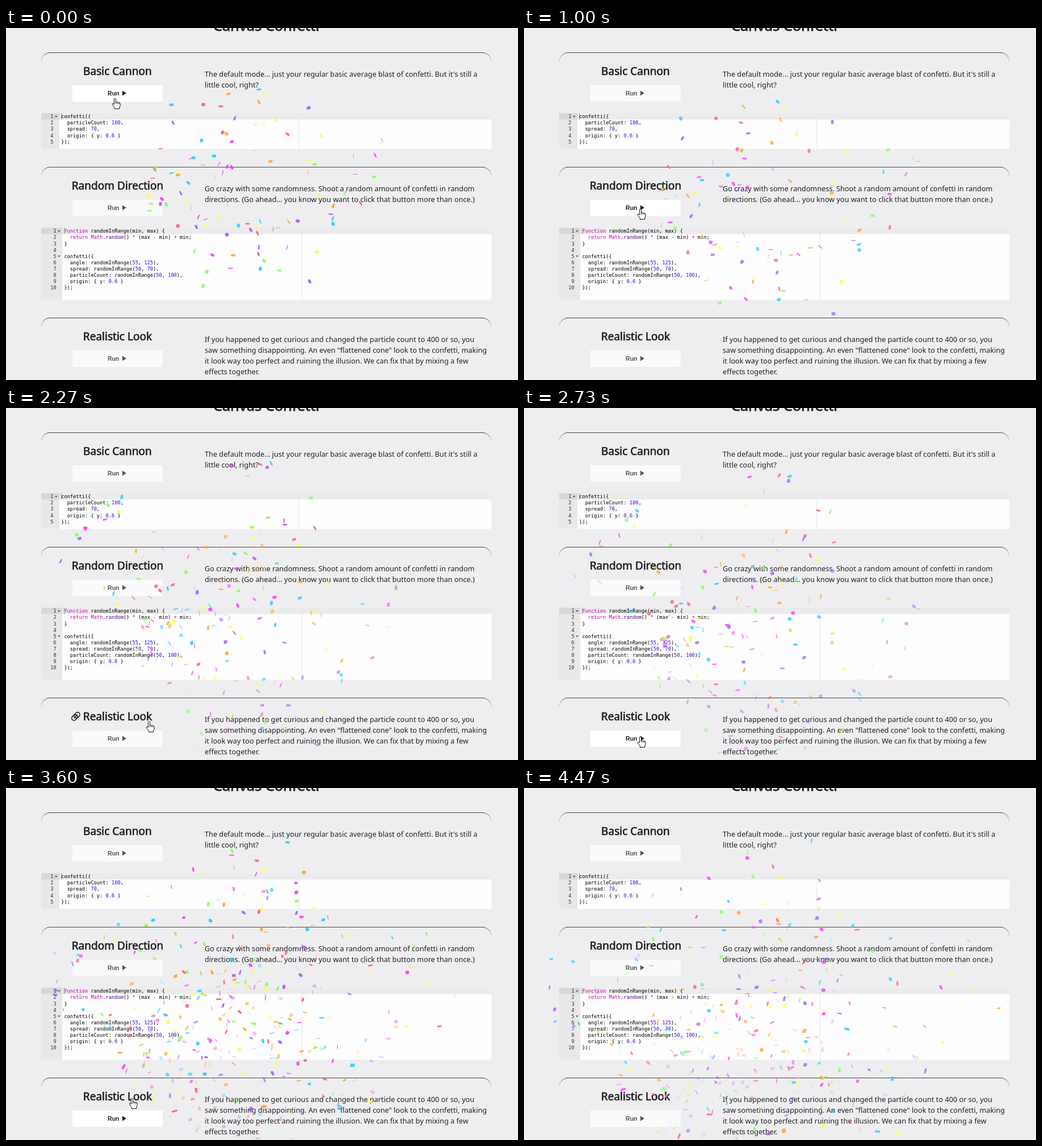
These frames come from a looping animation (902 by 621 pixels, 4.54 s). An HTML page with a canvas:

```html
<!DOCTYPE html>
<html lang="en">
<head>
<meta charset="utf-8">
<title>Canvas Confetti</title>
<style>
  html, body { margin: 0; width: 100%; height: 100%; overflow: hidden; background: #eeeef0; }
  svg, canvas { position: absolute; left: 0; top: 0; width: 902px; height: 621px; }
  .edge { position: absolute; left: 62px; width: 793px; height: 60px; box-sizing: border-box;
    border-top: 1px solid #444; border-radius: 16px; }
  text { font-family: "Noto Sans", "Open Sans", sans-serif; fill: #222; white-space: pre; }
  .body { font-size: 12.7px; }
  .head { font-size: 19.06px; text-anchor: middle; stroke: #222; stroke-width: .65px; }
  .title { font-size: 25.4px; stroke-width: .85px; }
  .run text { font: bold 10.6px "Liberation Sans", Arial, sans-serif; }
  .run rect { fill: #fafafc; }
  .run text, .run path { fill: #555; }
  .run.hot rect { fill: #fff; }
  .run.hot text, .run.hot path { fill: #222; }
  .code, .num { font: 8.68px "DejaVu Sans Mono", monospace; fill: #000; }
  .num { fill: #333; text-anchor: end; }
  .kw { fill: #c800a4; }
  .lit { fill: #3a00dc; }
  .fn { fill: #450084; }
</style>
</head>
<body>
<div class="edge" style="top:43px"></div>
<div class="edge" style="top:245px"></div>
<div class="edge" style="top:511px"></div>
<svg id="page" viewBox="0 0 902 621"></svg>
<canvas id="confetti" width="902" height="621"></canvas>
<svg viewBox="0 0 902 621">
  <g id="hand" stroke="#111" stroke-width="1" stroke-linejoin="round">
    <path fill="#fff" d="M-1.5 1Q0-1.2 1.5 1V7Q3 5.6 4.3 7.3Q5.8 6.2 6.9 8Q9 7.2 9.2 9.6V13L7.8 16V18.5H-.6V16.5L-4.4 11.3Q-5.2 9-3 9.2L-1.5 10.8Z"/>
    <path fill="none" d="M1.5 7V10M4.3 7.5V10M6.9 8V10.3"/>
  </g>
</svg>
<script>
const SCALE = 0.794, LOOP = 4540, STEP = 1000 / 15, ROW = 11.1;

// ---- page ----
const text = (cls, x, y, s) => `<text class="${cls}" x="${x}" y="${y}">${s}</text>`;
const rect = (x, y, w, h, fill) => `<rect x="${x}" y="${y}" width="${w}" height="${h}" fill="${fill}"/>`;

function section(top, name, lines) {
  const y = top + 58;
  return text('head', 196.5, top + 40, name) +
    `<g class="run"><rect x="117" y="${y}" width="159" height="29"/>` +
    text('', 179, y + 18, 'Run') + `<path d="M205 ${y + 9.5}L212 ${y + 14}L205 ${y + 18.5}Z"/></g>` +
    lines.map((s, i) => text('body', 350, top + 43 + i * 19, s)).join('');
}

const paint = line => line.replace(/\b(function|return|Math)\b|[*+]|-|\brandom\b|\b\d+(\.\d+)?\b/g, s => {
  const cls = /\d/.test(s) ? 'lit' : s === 'random' ? 'fn' : 'kw';
  return `<tspan class="${cls}">${s}</tspan>`;
});

function editor(top, height, gutter, margin, folds, lines) {
  const left = 62 + gutter;
  let out = rect(62, top, 793, height, '#fdfdfe') + rect(62, top, gutter, height, '#e8e8e9') +
    rect(62, top, gutter, ROW, '#d8d8d9') + rect(left, top, 855 - left, ROW, '#ebebec') +
    rect(margin, top, 1, height, '#e6e6e8') + rect(left + 3, top, 1, ROW, '#888');
  lines.forEach((line, i) => {
    const y = (top + 8.9 + i * ROW).toFixed(1);
    out += text('num', left - 10.5, y, i + 1) + text('code', left + 3.2, y, paint(line));
    if (folds.includes(i)) out += `<path d="M${left - 8} ${y - 4.2}h4.6l-2.3 2.8z" fill="#555"/>`;
  });
  return out;
}

const link = `<g id="link" fill="none" stroke="#222" stroke-width="1.6" transform="translate(123 544) rotate(-45)">
  <rect x="-8.5" y="-4" width="11" height="8" rx="4"/><rect x="-2.5" y="-4" width="11" height="8" rx="4"/>
  <path d="M-4.5 0H4.5"/></g>`;

document.getElementById('page').innerHTML =
  text('head title', 458.5, 5, 'Canvas Confetti') +
  section(43, 'Basic Cannon', [
    "The default mode... just your regular basic average blast of confetti. But it's still a",
    'little cool, right?']) +
  editor(150.3, 63, 32, 515.5, [0], [
    'confetti({', '  particleCount: 100,', '  spread: 70,', '  origin: { y: 0.6 }', '});']) +
  section(245, 'Random Direction', [
    'Go crazy with some randomness. Shoot a random amount of confetti in random',
    'directions. (Go ahead... you know you want to click that button more than once.)']) +
  editor(352.4, 127, 37.2, 521, [0, 4], [
    'function randomInRange(min, max) {', '  return Math.random() * (max - min) + min;', '}', '',
    'confetti({', '  angle: randomInRange(55, 125),', '  spread: randomInRange(50, 70),',
    '  particleCount: randomInRange(50, 100),', '  origin: { y: 0.6 }', '});']) +
  section(511, 'Realistic Look', [
    'If you happened to get curious and changed the particle count to 400 or so, you',
    'saw something disappointing. An even "flattened cone" look to the confetti, making',
    'it look way too perfect and ruining the illusion. We can fix that by mixing a few',
    'effects together.']) + link;

// ---- confetti ----
const COLORS = ['#26ccff', '#a25afd', '#ff5e7e', '#88ff5a', '#fcff42', '#ffa62d', '#ff36ff'];
const TICKS = 200, GRAVITY = 3;
let seed = 20417;
function random() {
  seed = (seed + 0x6d2b79f5) | 0;
  let r = Math.imul(seed ^ (seed >>> 15), 1 | seed);
  r = (r + Math.imul(r ^ (r >>> 7), 61 | r)) ^ r;
  return ((r ^ (r >>> 14)) >>> 0) / 4294967296;
}

// start: the blast time, in ticks
function blast(start, y, count, { angle = 90, spread = 70, speed = 45, decay = 0.9, scalar = 1 } = {}) {
  return Array.from({ length: count }, (_, i) => {
    const dir = (-angle + spread * (0.5 - random())) * Math.PI / 180;
    const v = speed * (0.5 + random());
    return {
      start, decay, scalar, x: 437 / SCALE, y: y / SCALE,
      vx: Math.cos(dir) * v, vy: Math.sin(dir) * v,
      wobble: random() * 10, wobbleSpeed: Math.min(0.11, random() * 0.1 + 0.05),
      tilt: (random() * 0.5 + 0.25) * Math.PI, salt: random() * 100,
      color: COLORS[i % COLORS.length], round: random() < 0.5
    };
  });
}

const pieces = [
  ...blast(-22, 535, 100),
  ...blast(33, 535, 88, { angle: 105, spread: 62 }),
  ...blast(86, 623, 50, { spread: 26, speed: 55 }),
  ...blast(86, 623, 40, { spread: 60 }),
  ...blast(86, 623, 70, { spread: 100, decay: 0.91, scalar: 0.8 }),
  ...blast(86, 623, 20, { spread: 120, speed: 25, decay: 0.92, scalar: 1.2 }),
  ...blast(86, 623, 20, { spread: 120 })
];

const ctx = document.getElementById('confetti').getContext('2d');

function drawPiece(p, tick) {
  const age = tick - p.start;
  if (age <= 0 || age >= TICKS) return;
  const run = (1 - p.decay ** age) / (1 - p.decay);
  const x = p.x + p.vx * run, y = p.y + p.vy * run + GRAVITY * age;
  const wobble = p.wobble + p.wobbleSpeed * age;
  const wx = 10 * p.scalar * Math.cos(wobble), wy = 10 * p.scalar * Math.sin(wobble);
  const noise = Math.sin(age * 12.9898 + p.salt * 78.233) * 43758.5453;
  const r = 2 + noise - Math.floor(noise), tilt = p.tilt + 0.1 * age;
  const tx = r * Math.cos(tilt), ty = r * Math.sin(tilt);
  ctx.globalAlpha = 1 - age / TICKS;
  ctx.fillStyle = p.color;
  ctx.beginPath();
  if (p.round) {
    ctx.ellipse(x, y, Math.abs(wx) * 0.6, Math.abs(wy) * 0.6, Math.PI / 10 * wobble, 0, 2 * Math.PI);
  } else {
    const f = Math.floor;
    ctx.moveTo(f(x), f(y));
    ctx.lineTo(f(x + wx), f(y + ty));
    ctx.lineTo(f(x + wx + tx), f(y + wy + ty));
    ctx.lineTo(f(x + tx), f(y + wy));
  }
  ctx.fill();
}

// ---- pointer and hover ----
const PATH = [
  [0, 192, 124], [150, 192, 124], [800, 205, 319], [1150, 205, 319], [1250, 205, 323], [1650, 205, 323],
  [2100, 252, 553], [2450, 252, 553], [2750, 205, 580], [3400, 205, 580], [3600, 222, 547], [3850, 230, 650]
];
function pointer(t) {
  const i = PATH.findIndex(k => k[0] > t);
  if (i < 0) return PATH[PATH.length - 1].slice(1);
  const [t0, x0, y0] = PATH[i - 1], [t1, x1, y1] = PATH[i];
  const u = (t - t0) / (t1 - t0), e = u * u * (3 - 2 * u);
  return [x0 + (x1 - x0) * e, y0 + (y1 - y0) * e];
}

const HOVER = [[0, 250], [720, 1760], [2660, 3700]];
const runs = document.querySelectorAll('.run');
const hand = document.getElementById('hand'), linkIcon = document.getElementById('link');

function draw(n) {
  const t = n * STEP;
  ctx.setTransform(1, 0, 0, 1, 0, 0);
  ctx.clearRect(0, 0, 902, 621);
  ctx.scale(SCALE, SCALE);
  for (const p of pieces) drawPiece(p, n * 2);
  hand.setAttribute('transform', `translate(${pointer(t).map(Math.round)})`);
  runs.forEach((el, i) => el.classList.toggle('hot', t >= HOVER[i][0] && t < HOVER[i][1]));
  linkIcon.style.display = t > 2020 && t < 2600 ? '' : 'none';
}

const begin = performance.now();
let shown = -1;
function loop() {
  const t = (performance.now() - begin) % LOOP;
  const n = Math.min(67, Math.floor((t + 3.4) / STEP));
  if (n !== shown) draw(shown = n);
  requestAnimationFrame(loop);
}
loop();
</script>
</body>
</html>
```
